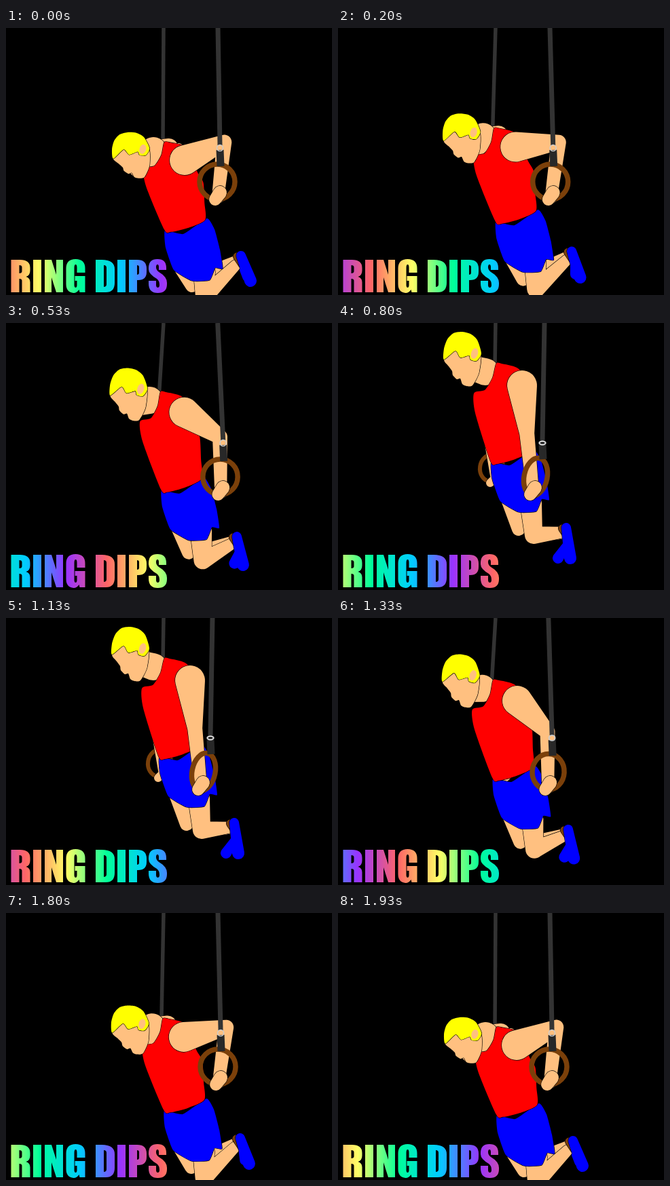
Write an HTML page with a canvas that moves like this. It is 480 px wide and 394 px high and loops after 1990 ms.

```html
<!DOCTYPE html>
<html lang="en">
<head>
<meta charset="utf-8">
<title>Ring dips</title>
<style>
html, body { margin: 0; height: 100%; overflow: hidden; background: #000; }
canvas { display: block; }
</style>
</head>
<body>
<canvas id="stage" width="480" height="394" role="img" aria-label="RING DIPS"></canvas>
<script>
const ctx = document.getElementById('stage').getContext('2d');
const SKIN = '#ffc080', BROWN = '#7b400a', BLUE = '#00f', ROPE = '#333';
const RAINBOW = ['#ff6666', '#ffff66', '#00ff99', '#00ccff', '#9933ff'];

// Rigid outlines; the head is drawn around its centre, the tank from its strap, the shorts from the belt.
const FACE = [-27,14, -20,24, -15,31, -14,37, -8,43, -3,42, 0,50, 6,53, 15,52, 25,32, 25,0, -18,-5];
const HAIR = [-27,14, -27,-2, -22,-16, -13,-25, -1,-27, 12,-24, 22,-15, 28,5, 21,16, 12,14, 10,8, -3,11, -10,1];
const TANK = [-33,45, -17,40, -7,22, -3,1, 5,1, 32,10, 46,50, 55,68, 57,102, 58,130, 34,143, 8,150, -2,146, -29,75];
const SHORTS = [-31,7, -4,12, 31,-11, 42,5, 50,35, 54,63, 43,62, 35,80, 9,81, -18,65, -30,32];

// Heavy condensed capitals: advance width and outline.
const GLYPHS = {
  R: [32.5, 'M0 0H13Q28 0 28 12V16Q28 23 22 25Q28 27 28 33V48H16V31Q16 28 12 28V48H0ZM12 8V20Q16 20 16 17V11Q16 8 12 8Z'],
  I: [17, 'M0 0H12V48H0Z'],
  N: [31.5, 'M0 0H10L17 22V0H27V48H17L10 26V48H0Z'],
  G: [32, 'M28 19H16V12Q16 7 14 7T12 12V37Q12 41 14 41T16 37V31H13V24H28V48H20L19 44Q16 49 11 49Q0 48 0 36V13Q0 -1 14 -1T28 13Z'],
  D: [32, 'M0 0H9Q28 0 28 14V34Q28 48 15 48H0ZM12 8V40Q16 40 16 36V12Q16 8 12 8Z'],
  P: [29, 'M0 0H12Q26 0 26 13V18Q26 30 14 30H12V48H0ZM12 8V22Q15 22 15 19V11Q15 8 12 8Z'],
  S: [30, 'M26 15H15V11Q15 7 13 7T11 11Q11 15 15 18Q27 25 27 34V36Q27 49 13.5 49T0 35V31H11V37Q11 41 13.5 41T16 37Q16 31 12 28Q0 21 0 14V12Q0 -1 13 -1T26 12Z'],
  ' ': [11.5, '']
};
const lettering = new Path2D();
let pen = 7.5;
for (const ch of 'RING DIPS') {
  const [advance, outline] = GLYPHS[ch];
  lettering.addPath(new Path2D(outline), new DOMMatrix([1, 0, 0, 1, pen, 342]));
  pen += advance;
}

const add = ([x, y], dx, dy) => [x + dx, y + dy];

function paint(path, fill) {
  ctx.strokeStyle = '#000';
  ctx.lineWidth = 1.2;
  ctx.stroke(path);
  ctx.fillStyle = fill;
  ctx.fill(path);
}

// Closed smooth outline through flat x,y pairs.
function blob(pts, fill, bend = .12) {
  const n = pts.length / 2, path = new Path2D();
  const at = i => [pts[(i + n) % n * 2], pts[(i + n) % n * 2 + 1]];
  path.moveTo(...at(0));
  for (let i = 0; i < n; i++) {
    const [a, b, c, d] = [at(i - 1), at(i), at(i + 1), at(i + 2)];
    path.bezierCurveTo(
      b[0] + (c[0] - a[0]) * bend, b[1] + (c[1] - a[1]) * bend,
      c[0] - (d[0] - b[0]) * bend, c[1] - (d[1] - b[1]) * bend, ...c);
  }
  paint(path, fill);
}

// Joined tapered capsules, each [from, to, radius, end radius].
function limb(fill, ...parts) {
  const path = new Path2D();
  for (const [a, b, ra, rb] of parts) {
    const dx = b[0] - a[0], dy = b[1] - a[1], turn = Math.atan2(dy, dx);
    const lean = Math.acos((ra - rb) / Math.hypot(dx, dy));
    const cap = new Path2D();
    cap.arc(...a, ra, turn + lean, turn - lean + 2 * Math.PI);
    cap.arc(...b, rb, turn - lean, turn + lean);
    cap.closePath();
    path.addPath(cap);
  }
  paint(path, fill);
}

function line(a, b, color, width) {
  ctx.beginPath();
  ctx.moveTo(...a);
  ctx.lineTo(...b);
  ctx.strokeStyle = color;
  ctx.lineWidth = width;
  ctx.stroke();
}

function hoop(x, y, rx, ry, tilt, color, width) {
  ctx.beginPath();
  ctx.ellipse(x, y, rx, ry, tilt, 0, 7);
  ctx.strokeStyle = color;
  ctx.lineWidth = width;
  ctx.stroke();
}

function placed(matrix, drawing) {
  ctx.save();
  ctx.transform(...matrix);
  drawing();
  ctx.restore();
}

// Two-bone joint on the outer side of the line from shoulder to hand.
function elbowOf(s, h, upper = 64, lower = 82) {
  const dx = h[0] - s[0], dy = h[1] - s[1], d = Math.hypot(dx, dy);
  const along = (upper ** 2 - lower ** 2 + d * d) / (2 * d);
  const out = Math.sqrt(Math.max(0, upper ** 2 - along ** 2));
  return add(s, (dx * along + dy * out) / d, (dy * along - dx * out) / d);
}

function drawFarSide(strap, u, turn) {
  line([232, 0], add(strap, -5, 5), ROPE, 5.5);
  placed([1, 0, 0, 1, 30 * (1 - turn), 0], () => {
    hoop(226, 214, 17, 20, .15, BROWN, 6);
    limb(SKIN, [[224, 178], [229, 225], 8, 5], [[224, 236], [229, 231], 6, 6]);
  });
  limb(SKIN, [add(strap, -14, 10 + 10 * u), add(strap, 4, 8 + 10 * u), 13, 13]);
}

function drawLegs(belt, u) {
  const knee = add(belt, 27 + 4 * u, 104 + 11 * u), ankle = [344 - 10 * u, 343 - 34 * u];
  limb(SKIN, [add(belt, -3, 62), add(belt, 9, 88 + 18 * u), 14, 10]);
  limb(SKIN, [add(knee, 18 * (1 - u), -38 * (1 - u)), ankle, 11, 9]);
  limb(SKIN, [add(belt, 27, 68), knee, 16, 13], [knee, add(ankle, -6 + 4 * u, 7 - 7 * u), 13, 8]);
  limb(BROWN, [add(ankle, -4, -6), add(ankle, 4, 6), 5.5, 5.5]);
  limb(BLUE,
    [add(ankle, 2, -7), add(ankle, 16 - 8 * u, 30 + 8 * u), 7, 9],
    [add(ankle, 5, 14), add(ankle, 12 - 22 * u, 24 + 14 * u), 5, 8]);
  placed([1, 0, 0, 1, ...belt], () => blob(SHORTS, BLUE, .07));
}

function drawTorso(strap, belt) {
  const lean = (belt[0] - strap[0] - 30) / 140, reach = (belt[1] - strap[1]) / 140;
  placed([1, 0, lean, reach, ...strap], () => blob(TANK, '#f00'));
}

function drawHead(head, u) {
  placed([1, 0, 0, 1, ...head], () => {
    ctx.rotate(-.14 * (1 - u) ** 2);
    ctx.scale(1, .87 + .13 * Math.sqrt(u));
    blob(FACE, SKIN);
    blob(HAIR, '#ff0');
    ctx.fillStyle = SKIN;
    ctx.beginPath();
    ctx.ellipse(18, 5, 5, 8, .3, 0, 7);
    ctx.fill();
  });
}

function drawNearArm(u, sway, turn) {
  const x = 311 + 9 * u - 29 * turn;
  const shoulder = [263 + 8 * u - sway, 195 - 103 * u], hand = [x + 1 - 5 * turn, 250];
  const elbow = elbowOf(shoulder, hand), band = x + 4 + 6 * turn;
  limb(SKIN, [shoulder, elbow, 22, 11], [elbow, hand, 11, 9]);
  line([312 - 8 * turn, 0], [band, 173], ROPE, 7);
  hoop(x, 227, 26 - 9 * turn, 26 + 2 * turn, .2 * turn, BROWN, 7.5);
  limb(SKIN, [add(hand, 3, -7), add(hand, -4, 3), 10, 9]);
  line([band, 180], [band + 1, 204 - 3 * turn], '#282828', 11);
  hoop(band, 177, 4.5, 4.5 - 2 * turn, 0, '#ccc', 1.5 + turn);
}

function drawTitle(k) {
  const step = 60, phase = (10.3 - k / 3) % 5, left = 7 - step * phase;
  const fill = ctx.createLinearGradient(left, 0, left + 10 * step, 0);
  for (let i = 0; i <= 10; i++) fill.addColorStop(i / 10, RAINBOW[i % 5]);
  ctx.fillStyle = fill;
  ctx.fill(lettering, 'evenodd');
}

function draw(now) {
  // Thirty held steps: up, a pause at lockout, and the same way down.
  const k = Math.min(29, Math.floor((now % 1990 + 4) * .015));
  const u = (Math.min(k, 29 - k, 12) / 12) ** 1.2;
  const sway = 6 * Math.sin(Math.PI * u);
  const turn = Math.max(0, (u - .6) / .4); // rings rotate as the arms straighten
  const head = [183 - sway / 2, 177 - 137 * u];
  const strap = [236 - sway, 168 - 109 * u];
  const belt = [265 - 8 * u, 292 - 94 * u ** 1.2];

  ctx.fillStyle = '#000';
  ctx.fillRect(0, 0, 480, 394);
  drawFarSide(strap, u, turn);
  drawLegs(belt, u);
  limb(SKIN, [add(head, 14, 26), add(strap, -19, 13), 18, 20]);
  drawTorso(strap, belt);
  drawHead(head, u);
  drawNearArm(u, sway, turn);
  drawTitle(k);
}

const start = performance.now();
function tick() {
  draw(performance.now() - start);
  requestAnimationFrame(tick);
}
tick();
</script>
</body>
</html>
```
